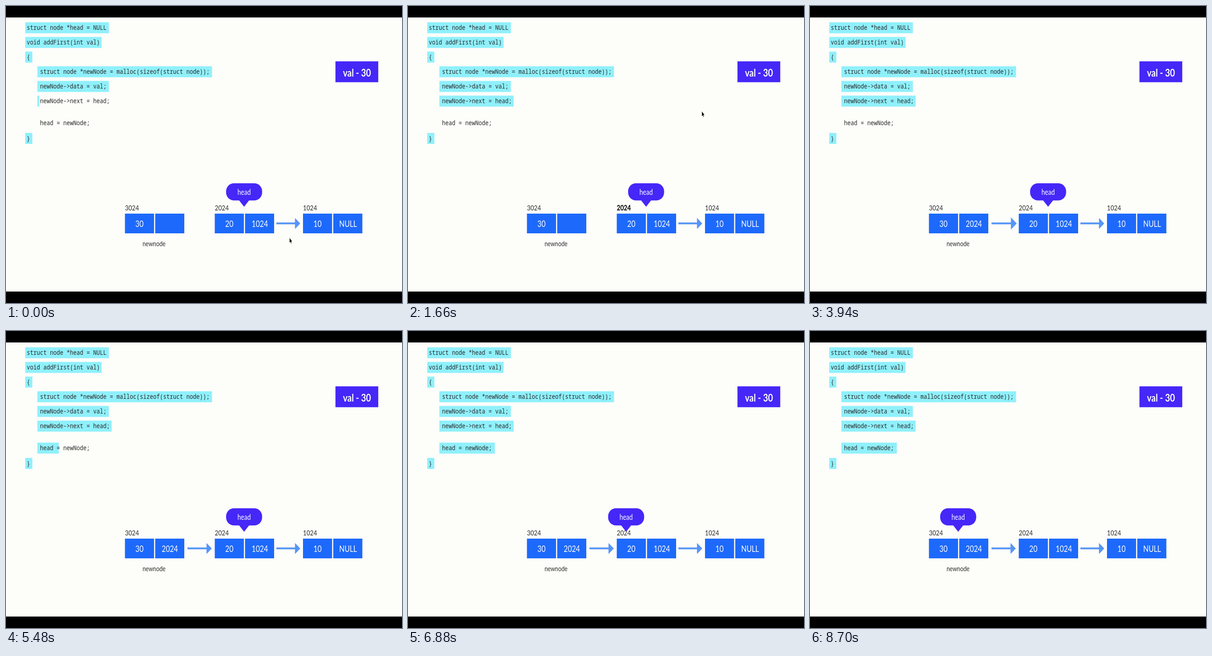
An HTML page with a canvas that plays this animation: 864 by 648 pixels, repeating every 8.72 s.

```html
<!DOCTYPE html>
<html lang="en">
<head>
<meta charset="utf-8">
<title>Linked list: add first</title>
<style>
html, body { margin: 0; width: 864px; height: 648px; overflow: hidden; background: #000; }
canvas { display: block; }
</style>
</head>
<body>
<canvas id="stage" width="864" height="648"></canvas>
<script>
const ctx = document.getElementById('stage').getContext('2d');
const LOOP = 8720;
const SQUEEZE = 0.813; // widescreen picture shown on a narrower stage
const SANS = 'Lato, sans-serif';
const MONO = '"Noto Sans Mono", monospace';
const PAPER = '#fdfdfa', INK = '#2a2a2a', MARK = '#8ff0fb';
const BLUE = '#1d69fb', PURPLE = '#4527f8', ARROW = '#5695f6';

// text, indent, highlight right edge, centre line, highlight start, duration
const CODE = [
  ['struct node *head = NULL', 0, 224.5, 47.5],
  ['void addFirst(int val)', 0, 208.5, 79.5],
  ['{', 0, 57.5, 111.5],
  ['struct node *newNode = malloc(sizeof(struct node));', 1, 449.5, 143.5],
  ['newNode->data = val;', 1, 224.5, 175.5],
  ['newNode->next = head;', 1, 230.5, 207.5, -16, 700],
  ['head = newNode;', 1, 189.5, 255.5, 5250, 600],
  ['}', 0, 57.5, 289]
];

const progress = (t, start, length) => Math.min(1, Math.max(0, (t - start) / length));
const smooth = u => u * u * (3 - 2 * u);
const mix = (a, b, u) => a + (b - a) * u;

function box(x, y, w, h, color) {
  ctx.fillStyle = color;
  ctx.fillRect(x, y, w, h);
}

function text(str, x, y, font, color, align = 'center') {
  ctx.save();
  ctx.translate(x, y);
  ctx.scale(SQUEEZE, 1);
  ctx.font = font;
  ctx.textAlign = align;
  ctx.fillStyle = color;
  ctx.fillText(str, 0, 0);
  ctx.restore();
}

function polygon(points, color) {
  ctx.beginPath();
  points.forEach(([x, y]) => ctx.lineTo(x, y));
  ctx.closePath();
  ctx.fillStyle = color;
  ctx.fill();
}

function codeLine([str, indent, right, y, start, length], t) {
  const left = indent ? 68.5 : 42;
  const shown = start === undefined ? 1 : progress(t, start, length);
  box(left, y - 12, (right - left) * shown, 24, MARK);
  text(str, indent ? 74.2 : 45.2, y + 4.8, `14.88px ${MONO}`, INK, 'left');
}

function node(x, address, data, next) {
  text(address, x, 445.9, `16.2px ${SANS}`, INK, 'left');
  [data, next].forEach((value, i) => {
    box(x + i * 66, 453, 63.5, 43, BLUE);
    text(value, x + i * 66.6 + 31.7, 482, `18.8px ${SANS}`, '#fff');
  });
}

function arrow(x, tip, size = 1) {
  const base = tip - 11.5 * size;
  box(x, 472.3, Math.max(0, base - x + 1), 4, ARROW);
  polygon([[base, 474.5 - 12 * size], [tip, 474.5], [base, 474.5 + 12 * size]], ARROW);
}

function bubble(x) {
  ctx.fillStyle = PURPLE;
  ctx.beginPath();
  ctx.roundRect(x - 39.3, 386.7, 78.6, 37.6, 17.5);
  ctx.fill();
  polygon([[x - 11, 424], [x + 11, 424], [x, 438]], PURPLE);
  text('head', x, 412, `16.6px ${SANS}`, '#fff');
}

// A copy of the address travels into the empty cell.
function flyingAddress(t) {
  if (t < 1400) return;
  const u = smooth(progress(t, 1750, 750));
  const shade = Math.round(mix(20, 255, progress(u, 0.75, 0.25)));
  const weight = u < 0.8 ? 'bold ' : '';
  text('2024', mix(470.8, 357.5, u), mix(445.9, 482, u),
    `${weight}${mix(16.2, 18.8, u)}px ${SANS}`, `rgb(${shade},${shade},${shade})`);
}

function cursor(t) {
  if (t > 2650) return;
  const u = smooth(progress(t, 300, 1000));
  const x = mix(618.5, 641, u), y = mix(505.5, 229.5, u);
  const shape = [[0, 0], [0, 11.5], [2, 9.3], [3.6, 13], [5, 12.2], [3.5, 8.7], [6.2, 8.5]];
  polygon(shape.map(([dx, dy]) => [x + dx, y + dy]), '#000');
  ctx.strokeStyle = '#fff';
  ctx.lineWidth = 0.6;
  ctx.stroke();
}

function draw(t) {
  box(0, 0, 864, 648, '#000');
  box(0, 25, 864, 598, PAPER);
  CODE.forEach(line => codeLine(line, t));

  box(718.8, 120.7, 93.4, 45.6, PURPLE);
  text('val - 30', 765.7, 153.7, `bold 22.8px ${SANS}`, '#fff');

  node(259.5, '3024', '30', '');
  node(455.5, '2024', '20', '1024');
  node(648, '1024', '10', 'NULL');
  text('newnode', 323, 524, `15.1px ${SANS}`, INK);
  flyingAddress(t);

  arrow(590, 642);
  if (t >= 3350) {
    const grow = smooth(progress(t, 3350, 550));
    const settle = progress(t, 3960, 140);
    arrow(396, mix(408, 451, grow) - 2 * settle, mix(1.1, 1, settle));
  }

  bubble(mix(519.5, 323.3, smooth(progress(t, 6500, 1250))));
  cursor(t);
}

function tick() {
  draw(performance.now() % LOOP);
  requestAnimationFrame(tick);
}
tick();
</script>
</body>
</html>
```
